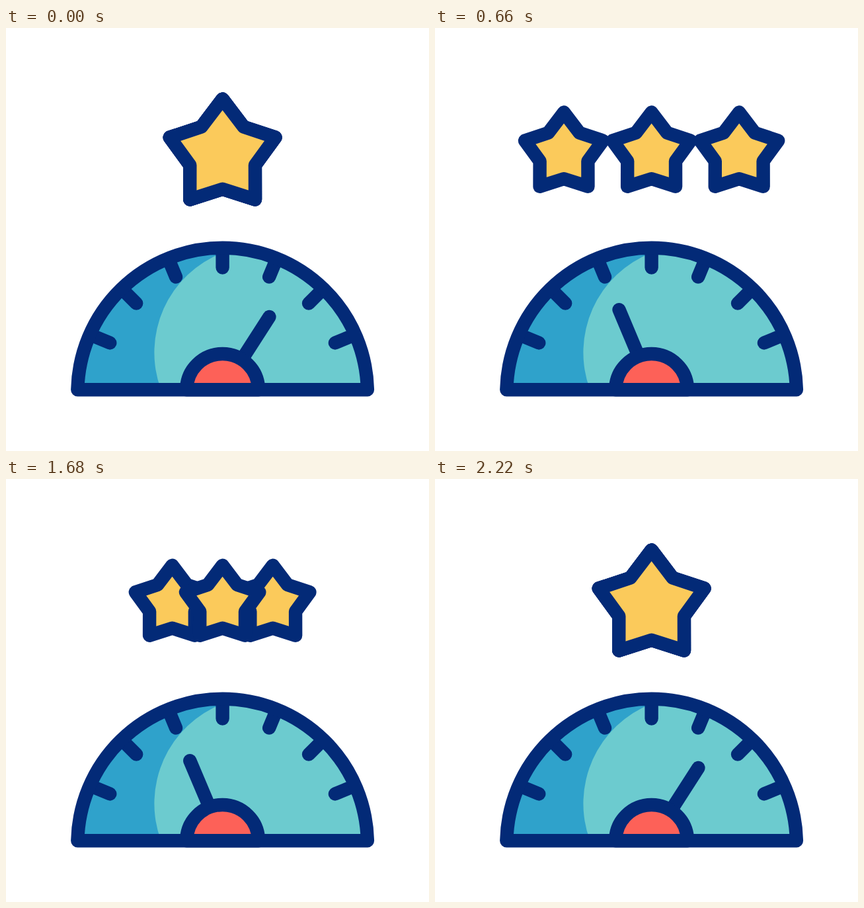
Recreate the animation shown at these times as an HTML page. Size 640 by 640 pixels, loop 2400 ms.

```html
<!DOCTYPE html>
<html lang="en">
<head>
<meta charset="utf-8">
<title>Rating gauge</title>
<style>
  html, body { margin: 0; width: 100%; height: 100%; overflow: hidden; background: #fff; }
  svg { display: block; width: 100vw; height: 100vh; }
  .ink { stroke: #032a77; stroke-width: 20.4; stroke-linecap: round; stroke-linejoin: round; fill: none; }
  .star { fill: #fbca5b; }
  .hub { fill: #fd6158; }
</style>
</head>
<body>
<svg viewBox="0 0 640 640">
  <path fill="#2fa2cb" d="M108.3 547.3A219.35 219.35 0 0 1 546.9 547.3Z"/>
  <path fill="#6ccbcf" d="M327.6 340A162 162 0 0 0 234.5 547.3H546.9A219.35 219.35 0 0 0 327.6 332.5Z"/>
  <path id="ticks" class="ink"/>
  <path id="needle" class="ink"/>
  <path class="ink hub" d="M273.2 547.3A54.4 54.4 0 0 1 382 547.3Z"/>
  <path class="ink" d="M108.3 547.3A219.35 219.35 0 0 1 546.9 547.3Z"/>
  <path id="left" class="ink star"/>
  <path id="right" class="ink star"/>
  <path id="middle" class="ink star"/>
</svg>
<script>
const LOOP = 2400;
const CX = 327.6, STAR_Y = 184.2;
const SPREAD = 153.5, SMALL = 0.697;

// Right half of the star, relative to its centre; the left half is mirrored.
const half = [[0, -76.7], [32, -34.6], [79.9, -18.7], [49.3, 23.3], [49.4, 75.3], [0, 59.5]];
const star = [...half, ...half.slice(1, 5).reverse().map(([x, y]) => [-x, y])];

const $ = id => document.getElementById(id);
const rad = deg => deg * Math.PI / 180;
const span = (t, a, b) => Math.min(1, Math.max(0, (t - a) / (b - a)));
const smooth = u => u * u * (3 - 2 * u);

// Point at a distance from a pivot, with the angle measured clockwise from up.
const polar = (x, y, r, deg) => [x + r * Math.sin(rad(deg)), y - r * Math.cos(rad(deg))];
const line = (a, b) => `M${a}L${b}`;

function starPath(x, scale) {
  return 'M' + star.map(([px, py]) => [x + px * scale, STAR_Y + py * scale]).join('L') + 'Z';
}

function drawTicks() {
  let d = '';
  for (let a = -67.5; a <= 67.5; a += 22.5) {
    d += line(polar(CX, 547, 212, a), polar(CX, 547, 184.4, a));
  }
  $('ticks').setAttribute('d', d);
}

// Needle swing: 0 points right, 1 points left.
function swing(t) {
  const u = span(t, 200, 800), w = span(t, 1500, 2220);
  const out = u - 0.32 * u * (1 - u);
  const back = w + w * (1 - w) * (0.16 + 0.12 * w);
  return out - back;
}

function draw(t) {
  const out = smooth(span(t, 200, 800));
  const dx = SPREAD * (out - smooth(span(t, 1500, 1860)));
  const scale = 1 - (1 - SMALL) * (out - smooth(span(t, 1840, 2220)));
  $('left').setAttribute('d', starPath(CX - dx, scale));
  $('right').setAttribute('d', starPath(CX + dx, scale));
  $('middle').setAttribute('d', starPath(CX, scale));

  const p = swing(t);
  const tip = polar(326.8, 560.5, 142.8, 30.1 - 70.1 * p);
  const end = polar(tip[0], tip[1], -80, 32.7 - 78 * p);
  $('needle').setAttribute('d', line(tip, end));
}

const start = performance.now();
function frame() {
  draw((performance.now() - start) % LOOP);
  requestAnimationFrame(frame);
}

drawTicks();
draw(0);
requestAnimationFrame(frame);
</script>
</body>
</html>
```
